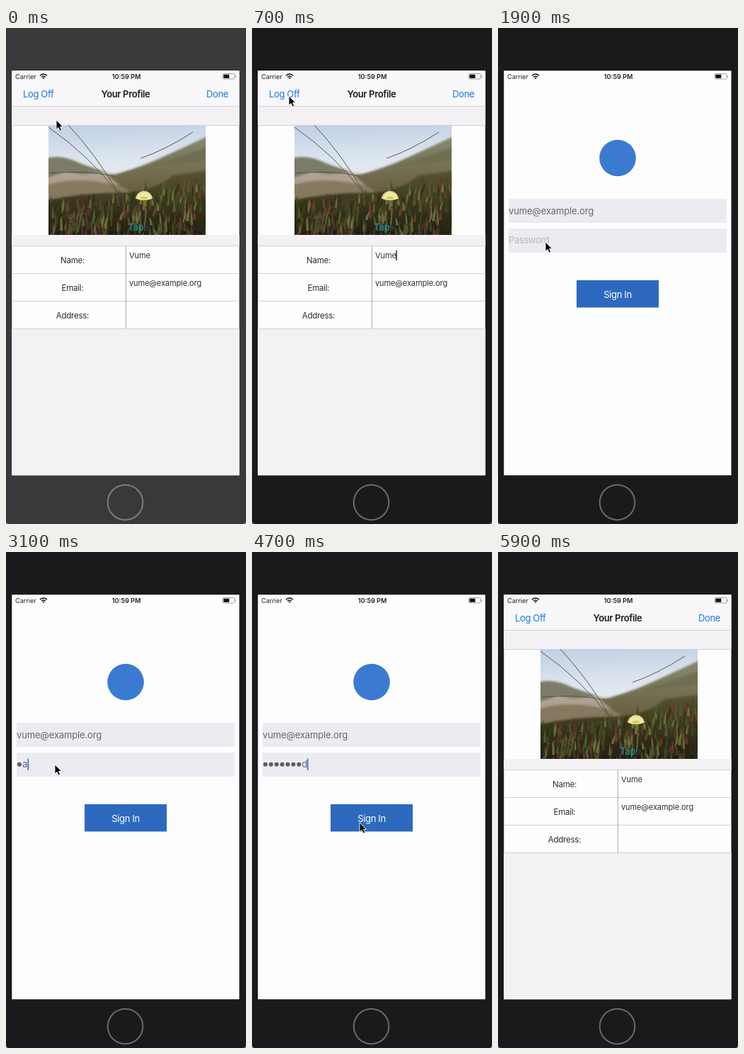
These frames come from a looping animation (339 px wide and 700 px high, 6 s). An HTML page:

```html
<!DOCTYPE html>
<html lang="en">
<head>
<meta charset="utf-8">
<title>Profile sign-in</title>
<style>
  html, body { margin: 0; width: 100%; height: 100%; overflow: hidden; background: #8b8a8c; }
  svg { display: block; width: 339px; height: 700px; }
  text { font: 13px Inter, "Liberation Sans", sans-serif; letter-spacing: -.35px; fill: #1c1c1e; }
  .mid { text-anchor: middle; }
  .end { text-anchor: end; }
  .status { font-size: 9.1px; letter-spacing: 0; fill: #222; }
  .bold { font-weight: 600; }
  .link { fill: #1a78e2; }
  .cell { font-size: 11.5px; letter-spacing: -.25px; fill: #2b2b2d; }
  .value { font-size: 11px; letter-spacing: -.1px; fill: #2f2f31; }
  .input { fill: #68676a; }
  .rule { stroke: #d2d0d5; fill: none; }
</style>
</head>
<body>
<svg viewBox="0 0 339 700">
  <defs>
    <linearGradient id="sky" x1="0" y1="0" x2=".15" y2="1">
      <stop offset="0" stop-color="#bfcfe4"/><stop offset=".6" stop-color="#dbe4ee"/><stop offset="1" stop-color="#e6ebf0"/>
    </linearGradient>
    <linearGradient id="sand" x1="0" y1="0" x2="0" y2="1">
      <stop offset="0" stop-color="#bdb3a6"/><stop offset="1" stop-color="#8f8069"/>
    </linearGradient>
    <linearGradient id="hill" x1="0" y1="0" x2="0" y2="1">
      <stop offset="0" stop-color="#8b8a72"/><stop offset="1" stop-color="#62593a"/>
    </linearGradient>
    <linearGradient id="ground" x1="0" y1="0" x2="0" y2="1">
      <stop offset="0" stop-color="#5b5533"/><stop offset=".5" stop-color="#38351c"/><stop offset="1" stop-color="#211a12"/>
    </linearGradient>
    <filter id="soft"><feGaussianBlur stdDeviation="1.500"/></filter>
    <clipPath id="frame"><path d="M60 137h222v155H60z"/></clipPath>
  </defs>

  <path id="bezel" d="M0 0H339V695Q339 700 334 700H5Q0 700 0 695Z"/>
  <circle id="home" cx="168.500" cy="669.500" r="24.800" fill="none" stroke-width="2"/>
  <path d="M8.300 60.300H329.500V631.300H8.300Z" fill="#fefdfe"/>

  <g id="profile">
    <path d="M8.300 60.300H329.500V110H8.300Z" fill="#f8f7f9"/>
    <path d="M8.300 110H329.500V137H8.300ZM8.300 292H329.500V308H8.300ZM8.300 424H329.500V631.300H8.300Z" fill="#f3f1f4"/>
    <path class="rule" d="M8.300 110.500h321.200M8.300 137.500h321.200M8.300 307.500h321.200M8.300 346.500h321.200M8.300 385.500h321.200M8.300 424.500h321.200"/>
    <path d="M169.300 308V424" stroke="#aaa9ac"/>
    <text class="link" x="24" y="98">Log Off</text>
    <text class="mid bold" x="169" y="98">Your Profile</text>
    <text class="link end" x="314" y="98">Done</text>

    <g clip-path="url(#frame)">
      <path d="M60 137h222v80H60z" fill="url(#sky)"/>
      <g filter="url(#soft)">
        <path d="M55 184Q82 179 108 192T158 206L200 205 290 195V265H55z" fill="url(#sand)"/>
        <path d="M55 184Q80 178 104 191L140 203 108 207 84 203 55 213z" fill="#7b7a68"/>
        <path d="M55 222Q90 211 130 217T178 226V242H55z" fill="#87795f"/>
        <path d="M145 209Q180 200 208 188T290 150V240L190 238Q162 226 145 209z" fill="url(#hill)"/>
        <path d="M196 196Q245 183 290 166V186Q236 194 196 196z" fill="#6f6e51"/>
        <path d="M55 243Q112 232 160 232T235 208L290 200V297H55z" fill="url(#ground)"/>
      </g>
      <g id="leaves"></g>
      <g id="grass" fill="none" stroke="#4a4c3b"></g>
      <g id="flower" fill="#efe9a6"></g>
    </g>
    <text class="mid" x="185" y="286" style="fill:#159aaa">Tap!</text>

    <text class="mid cell" x="94" y="332">Name:</text>
    <text class="mid cell" x="94" y="370.500">Email:</text>
    <text class="mid cell" x="94" y="409.500">Address:</text>
    <text class="value" x="174" y="325">Vume</text>
    <text class="value" x="174" y="363.500">vume@example.org</text>
    <path id="nameCaret" d="M204 314V328" stroke="#222" stroke-width="1.500"/>
  </g>

  <g id="login">
    <circle cx="169" cy="183.500" r="25.800" fill="#3a7bd1"/>
    <path d="M15 241H323V275H15ZM15 283H323V317H15Z" fill="#ebebf2"/>
    <text class="input" x="15" y="263" style="letter-spacing:-.15px">vume@example.org</text>
    <text id="hint" x="15" y="304" style="fill:#b9b8be">Password</text>
    <g id="dots" fill="#5d5c60"></g>
    <text id="letter" class="input" y="304"></text>
    <path id="caret" d="M0 291.500V308" stroke="#3e76c6" stroke-width="1.700"/>
    <path d="M111 356H227V394.500H111Z" fill="#2d69bf"/>
    <text id="signIn" class="mid" x="169" y="380.500" style="fill:#fff">Sign In</text>
  </g>

  <text class="status" x="13" y="72">Carrier</text>
  <g fill="none" stroke="#111" stroke-width="1.500">
    <path d="M48 67.300Q53 62.800 58 67.300M50 69.300Q53 66.700 56 69.300"/>
    <path d="M51.800 70.300L53 71.800 54.200 70.300Q53 69.500 51.800 70.300z" fill="#111" stroke-width=".5"/>
  </g>
  <text class="status mid bold" x="170" y="72">10:59 PM</text>
  <rect x="306" y="64.500" width="17" height="7.500" rx="1.700" fill="none" stroke="#8b8b8d" stroke-width=".8"/>
  <path d="M307.300 65.700h8v5.100h-8z" fill="#111"/>
  <path d="M324.300 67v2.600" stroke="#8b8b8d"/>

  <path id="cursor" d="M0 0V13.200L3.100 10.400 5.200 15.200 7.600 14.100 5.500 9.500H9.600Z" fill="#000" stroke="#fff" stroke-width=".9"/>
</svg>

<script>
const LOOP = 6000, STEP = 100;
const $ = id => document.getElementById(id);

function add(parent, tag, attrs) {
  const el = document.createElementNS("http://www.w3.org/2000/svg", tag);
  for (const k in attrs) el.setAttribute(k, attrs[k]);
  return $(parent).appendChild(el);
}

// Photo foreground
let seed = 11;
const rand = () => (seed = (seed * 16807) % 2147483647) / 2147483647;
const tones = ["#3f4d22", "#53602b", "#747a3f", "#2a3118", "#54352a", "#6b4032", "#454b25", "#30281a"];
const LEAVES = 340;
for (let i = 0; i < LEAVES; i++) {
  const x = 58 + rand() * 228;
  const top = 250 - Math.max(0, x - 140) * 0.24;
  const y = top + (300 - top) * i / LEAVES;
  const h = 9 + rand() * 13, lean = (rand() - 0.4) * 8, w = 1 + rand();
  add("leaves", "path", {
    d: `M${x - w} ${y}Q${x - w} ${y - h / 2} ${x + lean} ${y - h}Q${x + w * 1.6} ${y - h / 2} ${x + w} ${y}Z`,
    fill: tones[Math.floor(rand() * tones.length)], opacity: 0.8
  });
}
for (const d of ["M88 137Q128 180 158 232", "M60 140Q118 180 160 236", "M62 205Q112 200 152 209",
  "M80 274Q112 246 174 234", "M190 184Q225 172 264 147"])
  add("grass", "path", { d, "stroke-width": 0.9 });

for (let i = 0; i < 13; i++)
  add("flower", "ellipse", { cx: 195, cy: 236, rx: 1.8, ry: 6.5,
    transform: `rotate(${-78 + i * 13} 195 242)` });
add("flower", "ellipse", { cx: 195, cy: 240, rx: 5, ry: 2.2, fill: "#dccb58" });

// Timeline
const SECRET = "password", PITCH = 7.9;
const keyTimes = [2800, 3000, 3200, 3500, 3700, 3900, 4100, 4300];
const moves = [
  [0, 71, 130], [500, 52, 96], [1100, 52, 96], [1400, 50, 190], [1800, 65, 304],
  [2000, 69, 300], [4300, 69, 300], [4700, 152, 382], [5000, 154, 382],
  [5600, 154, 382], [5800, 33, 46]
];
const dots = [...SECRET].map((_, i) => add("dots", "circle", { cx: 18.9 + i * PITCH, cy: 299.7, r: 3 }));

function pointer(t) {
  const i = moves.findIndex(m => m[0] > t);
  if (i < 0) return moves.at(-1).slice(1);
  const [a, x, y] = moves[i - 1], [b, u, v] = moves[i];
  const k = (t - a) / (b - a);
  return [x + (u - x) * k, y + (v - y) * k];
}

const show = (id, on) => $(id).setAttribute("visibility", on ? "inherit" : "hidden");

function draw(t) {
  const active = t >= 700, login = t >= 800 && t < 5000;
  $("bezel").setAttribute("fill", active ? "#1b191c" : "#3a383b");
  $("home").setAttribute("stroke", active ? "#69686a" : "#7c7b7d");
  show("profile", !login);
  show("login", login);
  show("nameCaret", t >= 400 && t < 800);

  const count = keyTimes.filter(k => k <= t).length;
  show("hint", !count);
  dots.forEach((d, i) => d.setAttribute("visibility", i < count - 1 ? "inherit" : "hidden"));
  $("letter").textContent = count ? SECRET[count - 1] : "";
  $("letter").setAttribute("x", 15 + (count - 1) * PITCH);
  show("caret", login && t >= 2200);
  $("caret").setAttribute("transform", `translate(${15.5 + count * PITCH})`);
  $("signIn").setAttribute("opacity", t >= 4900 ? 0.5 : 1);

  $("cursor").setAttribute("transform", `translate(${pointer(t)})`);
  show("cursor", t < 5900);
}

// "inherit" on a hidden group's children keeps them hidden with it.
let last = -1;
function tick() {
  const t = Math.floor(performance.now() % LOOP / STEP) * STEP;
  if (t !== last) draw(last = t);
  requestAnimationFrame(tick);
}
tick();
</script>
</body>
</html>
```
